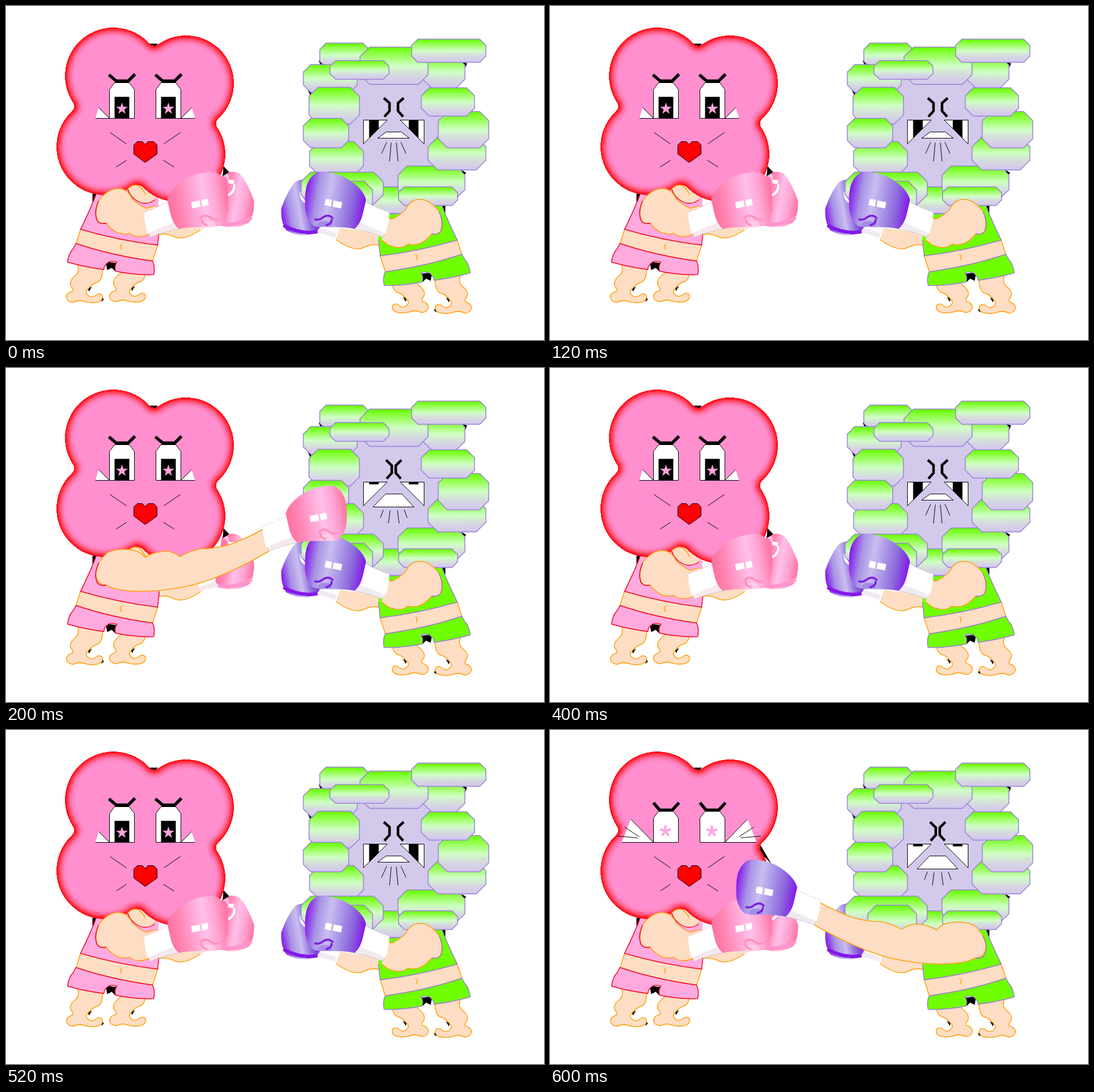
These frames come from a looping animation (949x590 px, 0.8 s). An HTML page with a canvas:

```html
<!DOCTYPE html>
<html lang="en">
<head>
<meta charset="utf-8">
<title>Boxing match</title>
<style>
html, body { margin: 0; width: 100%; height: 100%; overflow: hidden; background: #fff; }
canvas { display: block; }
</style>
</head>
<body>
<canvas id="stage" width="949" height="590"></canvas>
<script>
const ctx = document.getElementById('stage').getContext('2d');
const SKIN = '#fddec4', ORANGE = '#ff9f0a', INK = '#000', WHITE = '#fff';
const STEP = 200;

const PINK = {
  cloth: '#ffaadf', trim: '#f5001d', deep: '#ff6f9f', mid: '#ff86b4', soft: '#ffa3d2',
  pale: '#ffc0ea', thumb: '#ff8fc0', thumbPale: '#ffcbe6', rim: '#ff94cc', cuff: '#f6e9ee'
};
const PURPLE = {
  cloth: '#70ff00', trim: '#9a7bd6', deep: '#8417ea', mid: '#8a66dc', soft: '#a893e6',
  pale: '#cabdf0', thumb: '#7a1fe0', thumbPale: '#a58be6', rim: '#8417ea', cuff: '#f0eaf2'
};

function shape(d, fill, stroke, width = 1.5) {
  const p = new Path2D(d);
  if (fill) { ctx.fillStyle = fill; ctx.fill(p); }
  if (stroke) {
    ctx.strokeStyle = stroke;
    ctx.lineWidth = width;
    ctx.stroke(p);
  }
}

function gradient(x0, y0, x1, y1, ...colors) {
  const g = ctx.createLinearGradient(x0, y0, x1, y1);
  colors.forEach((c, i) => g.addColorStop(i / (colors.length - 1), c));
  return g;
}

function at(x, y, draw) {
  ctx.save();
  ctx.translate(x, y);
  draw();
  ctx.restore();
}

// Reflects a drawing so that x becomes sum - x.
function mirror(sum, dy, draw) {
  ctx.save();
  ctx.translate(sum, dy);
  ctx.scale(-1, 1);
  draw();
  ctx.restore();
}

function backGlove(c) {
  shape('M338 371L376 350L380 386Q360 387 342 395Z', c.cuff);
  shape('M338 371L376 350L378 374L340 386Z', WHITE);
  shape('M381 296Q398 288 412 296Q426 312 437 343Q438 368 428 382Q410 392 390 390Q374 388 369 376L375 330Z',
    gradient(372, 340, 438, 352, c.deep, c.mid, c.pale, c.soft, c.deep));
  shape('M373 384Q402 390 433 373', null, c.rim, 6);
  shape('M383 300Q392 296 390 306', null, c.pale, 5);
  shape('M391 306L402 307L401 314L392 313Z', WHITE);
  shape('M402 314Q404 327 391 334', null, WHITE, 4);
}

function backArm() {
  shape('M265 403Q283 400 298 408Q316 414 345 393L338 372L270 382Z', SKIN);
  shape('M268 403Q284 400 298 408Q316 414 345 393', null, ORANGE);
}

function leg() {
  shape('M125 455Q130 466 124 474Q110 484 114 494Q119 500 117 503Q106 506 106 514Q107 522 118 523' +
    'Q128 518 136 521Q150 526 163 522Q172 518 169 510Q163 505 157 511Q152 515 146 512' +
    'Q138 506 143 501Q150 490 162 487Q170 482 170 464', SKIN, ORANGE);
}

function body(c) {
  shape('M152 331L162 331L152 346ZM175 451L199 454L192 468L186 462L178 466Z', INK);
  shape('M144 499L151 495L146 504ZM169 513L172 518L168 522ZM220 498L227 494L222 503Z', INK);
  leg();
  at(76, -1, leg);
  shape('M131 394L123 419Q185 440 258 450L267 422Z', SKIN, ORANGE);
  shape('M205 419Q200 423 202 425L203 430', null, ORANGE);
  shape('M123 419Q185 440 258 450Q263 460 260 474Q225 475 193 468Q190 460 195 452Q187 449 180 452' +
    'Q172 458 172 465Q140 461 108 452Q110 436 118 428Z', c.cloth, c.trim);
  shape('M158 333Q150 355 131 394Q195 413 267 422L270 394L268 335L214 322L180 325Z', c.cloth);
  shape('M158 333Q150 355 131 394Q195 413 267 422L270 394', null, c.trim);
  shape('M214 312H262V342Q245 354 228 342Q217 334 214 322Z', SKIN);
  shape('M262 342Q245 354 228 342Q217 334 214 322', null, c.trim);
}

function frontArm(c, punch) {
  const d = punch
    ? 'M455 283Q425 300 395 311Q370 319 342 319Q322 323 307 333Q295 323 278 323Q260 325 245 334' +
      'Q238 324 222 321Q195 317 178 326Q162 340 158 360Q158 382 176 383' +
      'Q195 394 240 394Q310 392 360 373Q410 355 465 322'
    : 'M264 352L247 357Q234 352 222 340Q214 322 197 322Q180 322 164 342Q155 360 160 378Q166 386 176 383' +
      'Q182 392 196 400Q208 404 218 401Q230 412 252 403L264 394';
  shape(d, SKIN, ORANGE);
  shape('M163 344Q154 363 160 378Q166 386 176 383', null, c.trim);
}

function frontGlove(c) {
  shape('M243 364Q265 357 287 345L310 392Q278 398 254 408Q243 388 243 364Z', c.cuff, '#c9bcc2', 0.8);
  shape('M243 364Q265 357 287 345L305 380Q276 388 250 402Q243 385 243 364Z', WHITE);
  shape('M284 342Q286 331 299 318Q317 302 335 297Q356 291 369 293Q383 299 389 318Q393 336 391 361' +
    'Q387 380 376 388Q360 391 342 390Q320 390 304 393Q293 384 289 364Z',
    gradient(286, 352, 392, 335, c.deep, c.mid, c.soft, c.pale, c.soft, c.deep));
  shape('M326 346L341 343L343 354L328 357ZM344 342L355 340L357 351L346 354Z', WHITE);
  shape('M344 389Q345 378 357 379Q371 380 368 390Z', c.thumbPale);
  shape('M342 375Q350 366 360 373Q367 379 375 376M345 376Q343 384 355 387', null, c.thumb, 3.5);
}

function each(list, draw) { list.forEach(a => draw(...a)); }

function line(x0, y0, x1, y1) { shape(`M${x0} ${y0}L${x1} ${y1}`, null, INK, 1); }

function starPath(r, inner) {
  let d = '';
  for (let i = 0; i < 10; i++) {
    const a = i * Math.PI / 5 - Math.PI / 2, q = i % 2 ? inner : r;
    d += (i ? 'L' : 'M') + q * Math.cos(a) + ' ' + q * Math.sin(a);
  }
  return d + 'Z';
}

function asterisk(r) {
  let d = '';
  for (let i = 0; i < 5; i++) {
    const a = i * Math.PI * 0.4 - Math.PI / 2;
    d += `M0 0L${r * Math.cos(a)} ${r * Math.sin(a)}`;
  }
  shape(d, null, '#ffa3dc', 4);
}

function flowerEye(hit) {
  const top = hit ? 143 : 135;
  shape(`M182 198V${top + 12}L191 ${top}H217L226 ${top + 12}V198Z`, WHITE, INK, 1);
  if (hit) {
    at(203, 178, () => asterisk(10));
    shape('M182 128L193 141H215L227 128', null, INK, 5.5);
  } else {
    shape('M191 160H217V198H191Z', INK);
    at(204, 181, () => shape(starPath(11, 4.3), '#ffa3dc'));
    shape('M181 121L194 132H215L227 120', null, INK, 5.5);
  }
}

function flowerLash(hit) {
  if (hit) {
    shape('M126 198L142 157L182 198Z', WHITE);
    shape('M126 198H182L142 157M131 171L157 188M119 187L154 190', null, INK, 1);
  } else {
    shape('M157 198L163 179L182 198Z', WHITE);
    shape('M157 198H182L163 179', null, INK, 1);
  }
}

// Each lobe: centre, radius, start and end angle, then the control point of the notch after it.
const LOBES = [
  [189, 123, 85, 147, 317, 260, 74], [317, 136, 84, 235, 408, 366, 207],
  [302, 261, 84, -33, 137, 231, 312], [174, 248, 85, 56, 227, 124, 178]
];

function flowerPath() {
  const p = new Path2D(), rad = Math.PI / 180;
  LOBES.forEach(([x, y, r, a0, a1], i) => {
    if (i) {
      const [cx, cy] = LOBES[i - 1].slice(5);
      p.quadraticCurveTo(cx, cy, x + r * Math.cos(a0 * rad), y + r * Math.sin(a0 * rad));
    }
    p.arc(x, y, r, a0 * rad, a1 * rad);
  });
  const [x, y, r, a] = LOBES[0];
  p.quadraticCurveTo(124, 178, x + r * Math.cos(a * rad), y + r * Math.sin(a * rad));
  p.closePath();
  return p;
}

function flowerHead(hit) {
  const p = flowerPath();
  shape('M251 66L268 66L260 73ZM383 282L393 293L382 300Z', INK);
  if (hit) shape('M371 203L390 236L368 214Z', INK);
  ctx.save();
  ctx.clip(p);
  ctx.fillStyle = '#ff8fcf';
  ctx.fill(p);
  for (let w = 38; w > 0; w--) {
    const u = 1 - (1 - w / 38) ** 2;
    ctx.strokeStyle = `rgb(255,${143 * u},${207 * u})`;
    ctx.lineWidth = w;
    ctx.stroke(p);
  }
  ctx.restore();
  shape('M214 323Q229 307 242 326L246 333Z', SKIN);
  shape('M214 323Q229 307 242 326L246 333', null, ORANGE);

  flowerLash(hit);
  mirror(490, 0, () => flowerLash(hit));
  flowerEye(hit);
  at(82, 0, () => flowerEye(hit));
  each([[183, 223, 212, 243], [194, 284, 212, 272], [278, 243, 307, 223], [277, 272, 296, 284]], line);
  shape('M225 245L231 239H240L245 244L250 239H260L266 245V261L245 276L225 261Z', '#f00', INK, 1);
}

function stone(x0, y0, x1, y1, c) {
  shape(`M${x0 + c} ${y0}H${x1 - c}L${x1} ${y0 + c}V${y1 - c}L${x1 - c} ${y1}H${x0 + c}L${x0} ${y1 - c}V${y0 + c}Z`,
    gradient(0, y0, 0, y1, '#66ff00', '#9cff60', '#cfffc4', '#d6d8e0', '#d3c6ee'), '#9a7fd8');
}

const STONES = [
  [640, 319, 720, 366, 14], [553, 65, 640, 108, 11], [524, 103, 619, 152, 13], [735, 88, 809, 145, 16],
  [624, 72, 744, 138, 17], [571, 96, 675, 129, 10], [715, 58, 846, 99, 11],
  [534, 143, 623, 208, 16], [535, 239, 630, 299, 17], [524, 198, 604, 250, 13],
  [691, 282, 809, 340, 16], [744, 231, 846, 289, 17], [762, 186, 851, 250, 16], [732, 144, 826, 194, 14],
  [692, 319, 796, 352, 10], [520, 293, 665, 350, 17], [560, 309, 646, 365, 15]
];

// One half of the stone face; the other half is its reflection.
function stoneEye(hit) {
  shape('M630 201H672L630 243Z', WHITE);
  shape(hit ? 'M640 201H657V205H640Z' : 'M640 201H657V216L640 233Z', INK);
  shape('M630 201H672L630 243Z', null, INK, 1);
  shape(hit ? 'M670 162L680 172V185L671 195' : 'M666 162L676 171V185L667 195', null, INK, 4.5);
  each(hit ? [[665, 250, 660, 264], [677, 251, 674, 274]]
           : [[671, 240, 662, 260], [679, 241, 676, 274]], line);
}

function stoneHead(hit) {
  shape('M551 96L562 96L555 105ZM803 98L813 101L808 112ZM532 148L541 148L536 157Z', INK);
  shape('M818 184L829 187L826 194ZM803 289L811 294L807 300Z', INK);
  shape('M606 112H765V330H600Z', '#d3c9eb');
  each(STONES, stone);
  stoneEye(hit);
  mirror(1367, 0, () => stoneEye(hit));
  shape(hit ? 'M647 245L669 222H698L719 245Z' : 'M655 233L670 222H697L711 233Z', WHITE, INK, 1);
}

function pinkFist(punch) {
  frontArm(PINK, punch);
  at(punch ? 209 : 0, punch ? -85 : 0, () => frontGlove(PINK));
}

function purpleFist(punch) {
  mirror(926.5, 19, () => frontArm(PURPLE, punch));
  mirror(918.5 - (punch ? 199 : 0), punch ? -64 : 0, () => frontGlove(PURPLE));
}

function scene(step) {
  const pinkHits = step === 1, purpleHits = step === 3;
  backArm();
  backGlove(PINK);
  body(PINK);
  flowerHead(purpleHits);

  mirror(926.5, 19, backArm);
  mirror(922, 14, () => backGlove(PURPLE));
  mirror(926.5, 19, () => body(PURPLE));
  stoneHead(pinkHits || purpleHits);

  if (pinkHits) {
    purpleFist(false);
    pinkFist(true);
  } else {
    pinkFist(false);
    purpleFist(purpleHits);
  }
}

const start = performance.now();
let shown = -1;
function tick() {
  const step = Math.floor((performance.now() - start) / STEP) % 4;
  if (step !== shown) {
    shown = step;
    ctx.fillStyle = WHITE;
    ctx.fillRect(0, 0, 949, 590);
    at(0.5, 0.5, () => scene(step));
  }
  requestAnimationFrame(tick);
}
tick();
</script>
</body>
</html>
```
